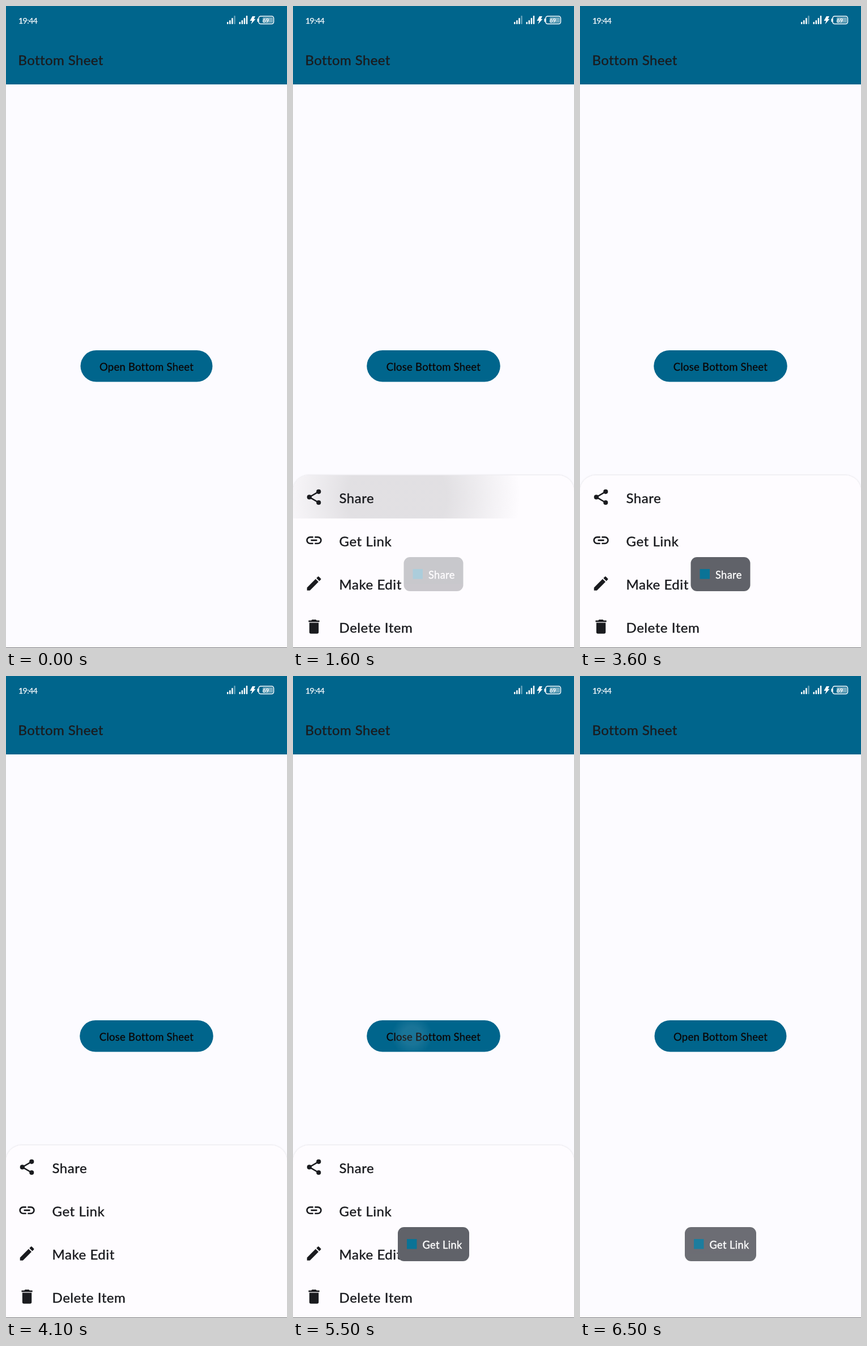
Write an HTML page that moves like this. It is 496 by 1130 pixels and loops after 6.6 s.

```html
<!DOCTYPE html>
<html lang="en">
<head>
<meta charset="utf-8">
<title>Bottom Sheet</title>
<style>
  html, body { margin: 0; width: 100%; height: 100%; overflow: hidden; background: #fcfbff; }
  svg { display: block; width: 100%; height: 100%; font-family: Lato, "Open Sans", sans-serif; }
  text { stroke: #1a1b1f; stroke-width: .4px; }
  .item { font-size: 24px; letter-spacing: .55px; }
  .status text { stroke: #fff; stroke-width: .25px; }
  .toast text { font-size: 18.3px; letter-spacing: .35px; fill: #fff; stroke: #fff; }
</style>
</head>
<body>
<svg viewBox="0 0 496 1130">
  <defs>
    <radialGradient id="lightRipple" gradientUnits="userSpaceOnUse" cx="210" cy="633" r="1">
      <stop offset=".45" stop-color="#fff"/><stop offset="1" stop-color="#fff" stop-opacity="0"/>
    </radialGradient>
    <radialGradient id="darkRipple" gradientUnits="userSpaceOnUse" cx="184" cy="38" r="1">
      <stop offset=".4" stop-color="#1b1b1f"/><stop offset="1" stop-color="#1b1b1f" stop-opacity="0"/>
    </radialGradient>
    <filter id="shadow" x="-5%" y="-5%" width="110%" height="110%">
      <feDropShadow dx="0" dy="0" stdDeviation="1.6" flood-color="#000" flood-opacity=".16"/>
    </filter>
    <path id="sheetShape" d="M0 310V28A28 28 0 0 1 28 0H468A28 28 0 0 1 496 28V310Z"/>
    <clipPath id="sheetClip"><use href="#sheetShape"/></clipPath>
  </defs>

  <rect width="496" height="1130" fill="#fcfbff"/>
  <rect width="496" height="138" fill="#00658c"/>
  <g class="status" fill="#fff">
    <text x="22" y="31" font-size="14" letter-spacing="-.5">19:44</text>
    <g id="signals"></g>
    <path d="M435 18H440L437.5 23H440.5L432.5 32L434.5 26H430.5Z"/>
    <rect x="443.5" y="22" width="2" height="6" rx="1"/>
    <rect x="446" y="18" width="26.5" height="13.5" rx="3.5" fill="none" stroke="#fff" stroke-width="1.5"/>
    <rect x="453" y="20" width="18" height="9.5" rx="1.5" opacity=".45"/>
    <text x="458.5" y="28.5" font-size="10" text-anchor="middle">69</text>
  </g>
  <text x="21.5" y="103.5" font-size="24" letter-spacing=".4" fill="#1b1c1e">Bottom Sheet</text>

  <rect id="button" y="606" height="55.5" rx="27.75" fill="#00658c"/>
  <text id="label" x="248" y="642" font-size="18.5" letter-spacing=".25" text-anchor="middle"></text>
  <rect id="buttonRipple" y="606" height="55.5" rx="27.75" fill="url(#lightRipple)"/>

  <g id="sheet">
    <use href="#sheetShape" fill="#fefcff" filter="url(#shadow)"/>
    <g clip-path="url(#sheetClip)">
      <rect id="rowRipple" width="496" height="76" fill="url(#darkRipple)"/>
    </g>
    <g id="rows" fill="#1a1b1f"></g>
  </g>

  <g id="toasts"></g>
  <rect y="1129" width="496" height="1" fill="#77777b"/>
</svg>

<script>
const LOOP = 6600, STEP = 100;
const PRESS = { open: 80, close: 5460 };
const MOVE = { open: 231, close: 5631 };
const LABEL = { open: 800, close: 6200 };
const TOASTS = [
  { text: 'Share', width: 105, start: 1517, end: 3830 },
  { text: 'Get Link', width: 126, start: 4250, end: 6480 }
];
const ROWS = [
  ['Share', `<path d="M18 5L6 12L18 19" fill="none" stroke="#1a1b1f" stroke-width="1.8"/>
    <circle cx="18" cy="5" r="3"/><circle cx="6" cy="12" r="3"/><circle cx="18" cy="19" r="2.95"/>`],
  ['Get Link', `<path d="M11 7.95H7A4.05 4.05 0 0 0 7 16.05H11M13 7.95H17A4.05 4.05 0 0 1 17 16.05H13M8 12H16"
    fill="none" stroke="#1a1b1f" stroke-width="1.95"/>`],
  ['Make Edit', `<path d="M3 17.25V21H6.75L17.81 9.94L14.06 6.19ZM20.71 7.04A1 1 0 0 0 20.71 5.63L18.37 3.29A1 1 0 0 0 16.96 3.29L15.13 5.12L18.88 8.87Z"/>`],
  ['Delete Item', `<path d="M6 19A2 2 0 0 0 8 21H16A2 2 0 0 0 18 19V7H6ZM19 4H15.5L14.5 3H9.5L8.5 4H5V6H19Z"/>`]
];

const $ = id => document.getElementById(id);
const set = (node, attrs) => {
  for (const key in attrs) node.setAttribute(key, attrs[key]);
};
const progress = (t, start, duration) => Math.min(1, Math.max(0, (t - start) / duration));

// Material standard easing: cubic-bezier(.4, 0, .2, 1)
function ease(x) {
  let low = 0, high = 1;
  for (let i = 0; i < 24; i++) {
    const s = (low + high) / 2, r = 1 - s;
    if (1.2 * r * r * s + .6 * r * s * s + s * s * s < x) low = s; else high = s;
  }
  return low * low * (3 - 2 * low);
}

$('signals').innerHTML = [390, 411.5].map((x, group) =>
  [4, 7, 11, 15].map((h, i) =>
    `<rect x="${x + i * 4.1}" y="${32 - h}" width="2.5" height="${h}" rx="1" opacity="${group === 0 && i === 3 ? .4 : 1}"/>`
  ).join('')).join('');

$('rows').innerHTML = ROWS.map(([text, icon], i) =>
  `<g transform="translate(0 ${i * 76})">
    <g transform="translate(20.6 22) scale(1.37)">${icon}</g>
    <text class="item" x="81.5" y="48.5">${text}</text>
  </g>`).join('');

$('toasts').innerHTML = TOASTS.map(({ text, width }) =>
  `<g class="toast" transform="translate(${248 - width / 2} 970)">
    <rect width="${width}" height="60" rx="11" fill="#606269"/>
    <rect x="16" y="21" width="17.5" height="17.5" fill="#0a7396"/>
    <text x="43.5" y="38">${text}</text>
  </g>`).join('');
const toastNodes = [...document.querySelectorAll('.toast')];

function render(t) {
  const opened = t >= LABEL.open && t < LABEL.close;
  const width = opened ? 235.5 : 233;
  const box = { x: 248 - width / 2, width };
  set($('button'), box);
  $('label').textContent = (opened ? 'Close' : 'Open') + ' Bottom Sheet';

  const pressAge = t - (t < PRESS.close ? PRESS.open : PRESS.close);
  set($('buttonRipple'), {
    ...box,
    opacity: pressAge > 0 ? .1 * (1 - progress(pressAge, 450, 375)) : 0
  });
  set($('lightRipple'), { r: Math.max(1, pressAge * .9) });

  const shown = ease(progress(t, MOVE.open, 300)) - ease(progress(t, MOVE.close, 300));
  set($('sheet'), {
    transform: `translate(0 ${1130 - 304 * shown})`,
    visibility: shown > .001 ? 'visible' : 'hidden'
  });

  const row = t < TOASTS[1].start - 20 ? 0 : 1;
  const rowAge = t - TOASTS[row].start + 20;
  set($('rowRipple'), {
    y: row * 76,
    opacity: rowAge > 0 ? .125 * (1 - progress(rowAge, 150, 120)) : 0
  });
  set($('darkRipple'), { cy: row * 76 + 38, r: Math.max(1, .0205 * rowAge * rowAge) });

  TOASTS.forEach(({ start, end }, i) => set(toastNodes[i], {
    opacity: progress(t, start, 250) * (1 - progress(t, end, 250))
  }));
}

const origin = performance.now();
function tick() {
  const t = (performance.now() - origin) % LOOP;
  render(Math.floor(t / STEP) * STEP);
  requestAnimationFrame(tick);
}
tick();
</script>
</body>
</html>
```
